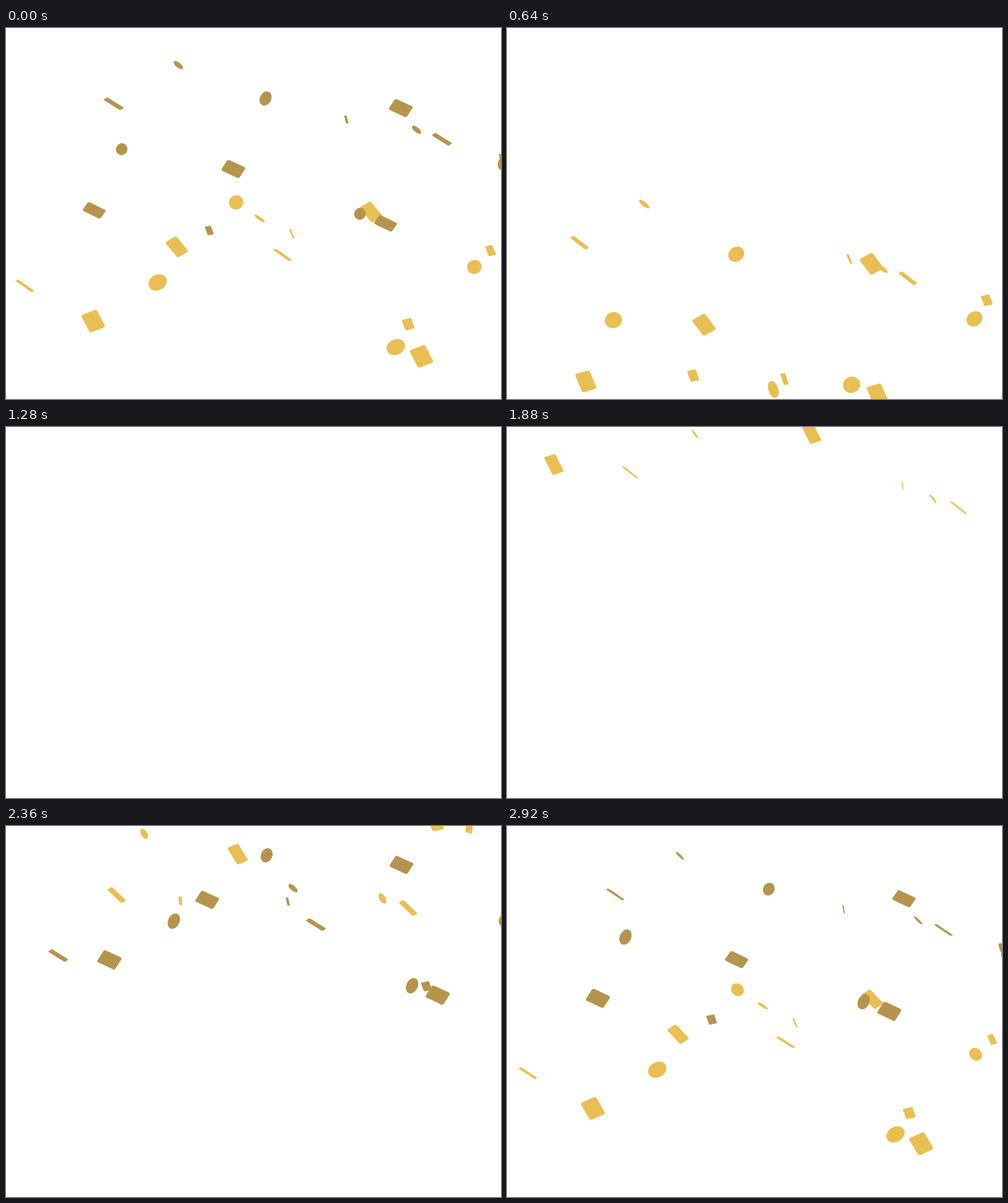
These frames come from a looping animation (800x600 px, 2960 ms). An HTML page with a canvas:

```html
<!DOCTYPE html>
<html lang="en">
<head>
<meta charset="utf-8">
<title>Falling gold confetti</title>
<style>
  html, body { margin: 0; width: 100%; height: 100%; overflow: hidden; background: #fff; }
  canvas { display: block; }
</style>
</head>
<body>
<canvas id="stage" width="800" height="600"></canvas>
<script>
const ctx = document.getElementById('stage').getContext('2d');
const LOOP = 2960, STEP = 40, LEAD = 1520, LIFE = 2180, TURN = 1302;
const LIGHT = '#e9bf53', DARK = '#b5944e';
const TWIN = [385, 104.5];

// Swings between [time, value] turning points with a cosine ease
function swing(...keys) {
  return t => {
    let i = 0;
    while (i < keys.length - 2 && t > keys[i + 1][0]) i++;
    const [t0, v0] = keys[i], [t1, v1] = keys[i + 1];
    const u = Math.min(1, Math.max(0, (t - t0) / (t1 - t0)));
    return v0 + (v1 - v0) * (1 - Math.cos(Math.PI * u)) / 2;
  };
}

const sway = swing([250, -13], [840, 0], [1730, -63.5], [2500, -15]);
const stripSway = swing([600, -31], [1200, 27], [1750, -4], [2200, -6]);
const tilt = swing([150, 72], [1200, 24], [2200, 73]);
const stripTilt = swing([400, 100], [1000, 77], [1500, 67], [2200, 72]);

// Apparent height while flipping; negative shows the dark face
const flip = swing([480, 19], [1260, -24], [1485, 4], [1850, 27], [2400, 5]);

// Pieces settle to a slow fall, then speed up at TURN
const fall = (t, slow, fast) => slow * Math.min(t, TURN) + fast * Math.max(t - TURN, 0);
const settle = t => 3e-5 * Math.max(0, 900 - t) ** 2;
const move = t => [sway(t), fall(t, .2968, .432) - settle(t)];
const stripMove = t => [stripSway(t), fall(t, .3425, .3667)];

// Each wave: delay, then where its pieces are LEAD ms into the loop of falling
const waves = [
  { delay: -370, rects: [[141, 474], [671.5, 531]], dot: [245, 411.5], strip: [650, 479] },
  { delay: -200, rects: [[276, 354], [590, 297.5]], dot: [372, 282], strip: [783, 360] },
  { delay: 0, rects: [[30.5, 417], [447, 367]], dot: [410, 308], strip: [462, 333], single: true },
  { delay: 185, rects: [[142.5, 295], [613.5, 316]], dot: [187, 196], strip: [328.5, 327.5] },
  { delay: 400, rects: [[367.5, 228], [638, 129.5]], dot: [419.5, 114], strip: [804, 210] },
  { delay: 600, rects: [[174, 122.5], [704.5, 180]], dot: [278.5, 60], strip: [550, 148] }
];

function card(length, height, base, radius) {
  ctx.transform(1, 0, -.11, Math.max(height, 1.2) / base, 0, 0);
  ctx.roundRect(-length / 2, -base / 2, length, base, radius);
}

function drawWave({ delay, rects, dot, strip, single }, time) {
  const t = time - delay;
  if (t > LIFE) return;

  function place([x, y], path, angle, outline) {
    const now = path(t), ref = path(LEAD - delay);
    ctx.save();
    ctx.translate(x + now[0] - ref[0], y + now[1] - ref[1]);
    ctx.rotate(angle * Math.PI / 180);
    ctx.beginPath();
    outline();
    ctx.restore();
    ctx.fill();
  }

  const face = flip(t), h = Math.abs(face), angle = tilt(t);
  const dots = single ? [dot] : [dot, [dot[0] + TWIN[0], dot[1] + TWIN[1]]];
  const dotAngle = angle + Math.min(15, Math.max(0, (1050 - t) / 16));
  const dotLength = 18.5 + Math.max(0, t - 1400) * .013;
  const stripLength = 13.5 + Math.max(0, t - 1000) * .005;

  ctx.fillStyle = face < 0 ? DARK : LIGHT;
  for (const p of rects) place(p, move, angle, () => card(32, h, 27, 3.5));
  for (const p of dots) place(p, move, dotAngle, () =>
    ctx.ellipse(0, 0, dotLength / 2, Math.max(h * .575, .8), 0, 0, 2 * Math.PI));
  place(strip, stripMove, stripTilt(t), () => card(stripLength, h * .58, 16, 1.5));
}

function frame() {
  const tick = Math.floor(performance.now() / STEP) * STEP % LOOP;
  const time = (tick + LEAD) % LOOP;
  ctx.clearRect(0, 0, 800, 600);
  for (const wave of waves) drawWave(wave, time);
  requestAnimationFrame(frame);
}
frame();
</script>
</body>
</html>
```
